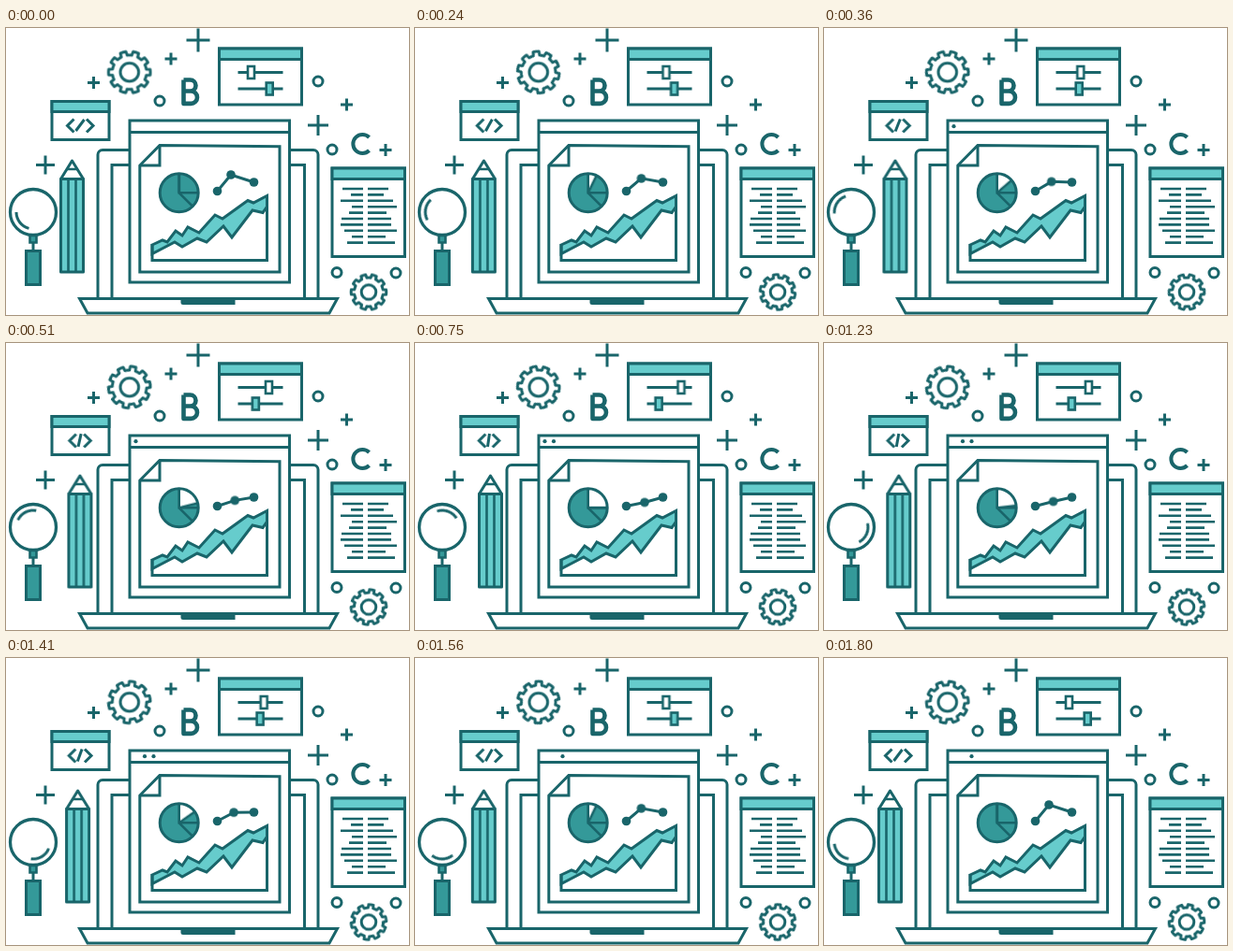
An HTML page for the animation above (1.83 s loop, 430 by 307 pixels).

```html
<!DOCTYPE html>
<html lang="en">
<head>
<meta charset="utf-8">
<title>Web tools</title>
<style>
  html, body { margin: 0; width: 100%; height: 100%; overflow: hidden; background: #fff; }
  svg {
    display: block; width: 430px; height: 307px;
    --dark: #19656a; --mid: #349999; --light: #66cccc;
    fill: none; stroke: var(--dark); stroke-width: 3;
  }
  .white { fill: #fff; }
  .mid { fill: var(--mid); }
  .light { fill: var(--light); }
  .solid { fill: var(--dark); stroke: none; }
  .thin { stroke-width: 2.6; }
  .round { stroke-linejoin: round; }

  .spin { animation: spin 1830ms linear infinite; }
  @keyframes spin { to { transform: rotate(360deg); } }

  /* Out, hold, back: all sliding parts share this rhythm. */
  .sway { animation: sway 1830ms cubic-bezier(.33, 0, .67, 1) infinite; }
  @keyframes sway {
    0%, 98.4% { transform: none; }
    37.2%, 61.2% { transform: var(--to); }
  }
  .late { animation: late 1830ms cubic-bezier(.33, 0, .67, 1) infinite; }
  @keyframes late {
    0%, 98.4% { transform: none; }
    44.3%, 54.1% { transform: var(--to); }
  }
  .slice { animation: slice 1830ms cubic-bezier(.33, 0, .67, 1) infinite; }
  @keyframes slice {
    0%, 98.4% { stroke-dasharray: 0 360; }
    37.2%, 61.2% { stroke-dasharray: 90 270; }
  }
  .link { animation: link 1830ms cubic-bezier(.33, 0, .67, 1) infinite; }
  @keyframes link {
    0%, 98.4% { d: path("M225.500 174.500L240 157L264.500 165"); }
    37.2%, 61.2% { d: path("M225.500 174.500L245 170.500L264.500 165"); }
  }
  .slash { animation: slash 1830ms cubic-bezier(.33, 0, .67, 1) infinite; }
  @keyframes slash {
    0%, 98.4% { d: path("M74.500 110L83.500 98"); }
    37.2%, 61.2% { d: path("M77.500 111L79.500 97"); }
  }

  .blink { animation: blink 1830ms step-end infinite; }
  @keyframes blink {
    0%, 66.667% { opacity: 0; }
    16.667% { opacity: 1; }
  }
</style>
</head>
<body>
<svg viewBox="0 0 430 307">
  <g id="marks"></g>

  <!-- letters -->
  <path class="round" stroke-width="4.6" d="M189.500 55.500H196.500a6 6 0 0 1 0 12H189.500M196.500 67.500h.8a6.700 6.700 0 0 1 0 13.400H189.500V55.500"/>
  <path stroke-width="4" d="M387.500 117a10 10 0 1 0 0 14"/>

  <!-- gears -->
  <g transform="translate(131.7 47.300)">
    <path class="gear spin round" data-r="22.300"/>
    <circle r="9.800"/>
  </g>
  <g transform="translate(387 282.500)">
    <path class="gear spin round" data-r="18.800"/>
    <circle r="7.800"/>
  </g>

  <!-- code window -->
  <path class="white" d="M49 78.500H110V119.500H49Z"/>
  <path class="light" d="M49 78.500H110V89.500H49Z"/>
  <path class="sway" style="--to: translateX(2.800px)" d="M72.500 97.500L65.500 104.500L72.500 111.500"/>
  <path class="sway" style="--to: translateX(-3.300px)" d="M86 97.500L93 104.500L86 111.500"/>
  <path class="slash" d="M74.500 110L83.500 98"/>

  <!-- sliders -->
  <path class="white" d="M227.500 22H315.500V82H227.500Z"/>
  <path class="light" d="M227.500 22H315.500V33.500H227.500Z"/>
  <path d="M247.500 47.500H295.500M247.500 65H295.500"/>
  <rect class="white sway thin" style="--to: translateX(22.500px)" x="258" y="41" width="7" height="13"/>
  <rect class="light late thin" style="--to: translateX(-21.500px)" x="277.700" y="58.500" width="7" height="13"/>

  <!-- text window -->
  <path class="white" d="M348 150H425.500V244.500H348Z"/>
  <path class="light" d="M348 150H425.500V161.500H348Z"/>
  <path id="rows" class="thin"/>

  <!-- magnifier -->
  <circle cx="29" cy="197" r="24.500" stroke-width="3.300"/>
  <g transform="translate(29 197)">
    <path class="spin" d="M-18 0A18 18 0 0 0 -4.500 17.400"/>
  </g>
  <path d="M29 228V239"/>
  <path class="mid thin" d="M25.500 222H32.500V229.500H25.500Z"/>
  <path class="mid" d="M21.500 238.500H36.500V274.500H21.500Z"/>

  <!-- pencil -->
  <g class="sway round" style="--to: translateX(10px)">
    <path class="white" d="M58.500 161.500L70.500 142L82.500 161.500Z"/>
    <path class="light" d="M58.500 161.500H82.500V261H58.500Z"/>
    <path class="thin" d="M66.500 161.500V261M74.500 161.500V261M65 151H76"/>
  </g>

  <!-- laptop -->
  <path class="white" d="M98 289V135.500a5 5 0 0 1 5 -5H328a5 5 0 0 1 5 5V289"/>
  <path d="M113 289V146.500H318.500V289"/>
  <path class="white" d="M78.500 289.500H353.500L345 305H87Z"/>
  <path class="solid" d="M186.500 288.500H244.500V296H189a2.500 2.500 0 0 1 -2.500 -2.500Z"/>

  <!-- browser -->
  <path class="white" d="M132 99H302.500V272H132Z"/>
  <path d="M132 111.500H302.500"/>
  <g class="solid">
    <circle class="blink" cx="138.500" cy="105.200" r="2.100"/>
    <circle class="blink" style="animation-delay: -1525ms" cx="148" cy="105.200" r="2.100"/>
    <circle class="blink" style="animation-delay: -1220ms" cx="157.500" cy="105.200" r="2.100"/>
  </g>

  <!-- report -->
  <path class="white" d="M164 125.500L292 126.800V261H142.800V147Z"/>
  <path d="M143 147H164V125.500"/>

  <g transform="translate(184.700 176.300)">
    <circle class="mid" r="20.500" stroke="none"/>
    <circle class="slice" r="10" stroke="#fff" stroke-width="20" pathLength="360" stroke-dasharray="0 360" transform="rotate(-90)"/>
    <path class="thin" d="M0 -20V0H20M0 0L14 14"/>
    <path class="sway thin" style="--to: rotate(90deg)" d="M0 0V-20"/>
    <circle r="20.500"/>
  </g>

  <path class="link" d="M225.500 174.500L240 157L264.500 165"/>
  <g class="solid">
    <circle cx="225.500" cy="174.500" r="4.800"/>
    <circle class="sway" style="--to: translate(5px, 13.500px)" cx="240" cy="157" r="4.800"/>
    <circle cx="264.500" cy="165" r="4.800"/>
  </g>

  <path class="light" d="M156 232L167 227L172 229L181 217L188 222L194 213L206 219L223 200L231 204L258 184.500L264 187L278.500 179.500V191L274 197.500L263 195L241 224L232 212L214 229L204 225L188 234L180 229L156 241.500Z"/>
  <path d="M156 231V248.500H278.500V179"/>
</svg>

<script>
  const plus = (x, y, r) => `<path d="M${x - r} ${y}h${2 * r}M${x} ${y - r}v${2 * r}"/>`;
  const ring = (x, y) => `<circle cx="${x}" cy="${y}" r="5"/>`;

  const pluses = [[205, 13, 12.5], [176, 33, 6.5], [93.5, 58.5, 6.5], [42, 146.5, 10],
    [333, 104, 11], [363.5, 82, 6.5], [405, 130.5, 6.5]];
  const rings = [[164, 78], [333, 57], [348, 130], [353, 261.5], [416, 262]];
  document.getElementById("marks").innerHTML =
    pluses.map(p => plus(...p)).join("") + rings.map(p => ring(...p)).join("");

  // Left and right ends of each row, around the gap in the middle.
  const rows = [[359, 408], [368, 403], [357, 413], [369, 417], [366, 406],
    [358, 411], [357, 411], [361, 417], [369, 405], [364, 415]];
  document.getElementById("rows").setAttribute("d", rows.map(([a, b], i) => {
    const y = 172 + i * 6.4;
    return `M${a} ${y}H381M386 ${y}H${b}`;
  }).join(""));

  function gearPath(outer, teeth = 10) {
    const inner = outer * 0.82, step = 2 * Math.PI / teeth;
    const at = (r, a) => `${(r * Math.sin(a)).toFixed(2)} ${(-r * Math.cos(a)).toFixed(2)}`;
    let d = "";
    for (let i = 0; i < teeth; i++) {
      const a = (i + 0.5) * step;
      d += `${i ? "L" : "M"}${at(inner, a - step * 0.29)}L${at(outer, a - step * 0.22)}`
        + `A${outer} ${outer} 0 0 1 ${at(outer, a + step * 0.22)}L${at(inner, a + step * 0.29)}`
        + `A${inner} ${inner} 0 0 1 ${at(inner, a + step * 0.71)}`;
    }
    return d + "Z";
  }
  for (const g of document.querySelectorAll(".gear")) g.setAttribute("d", gearPath(+g.dataset.r));
</script>
</body>
</html>
```
